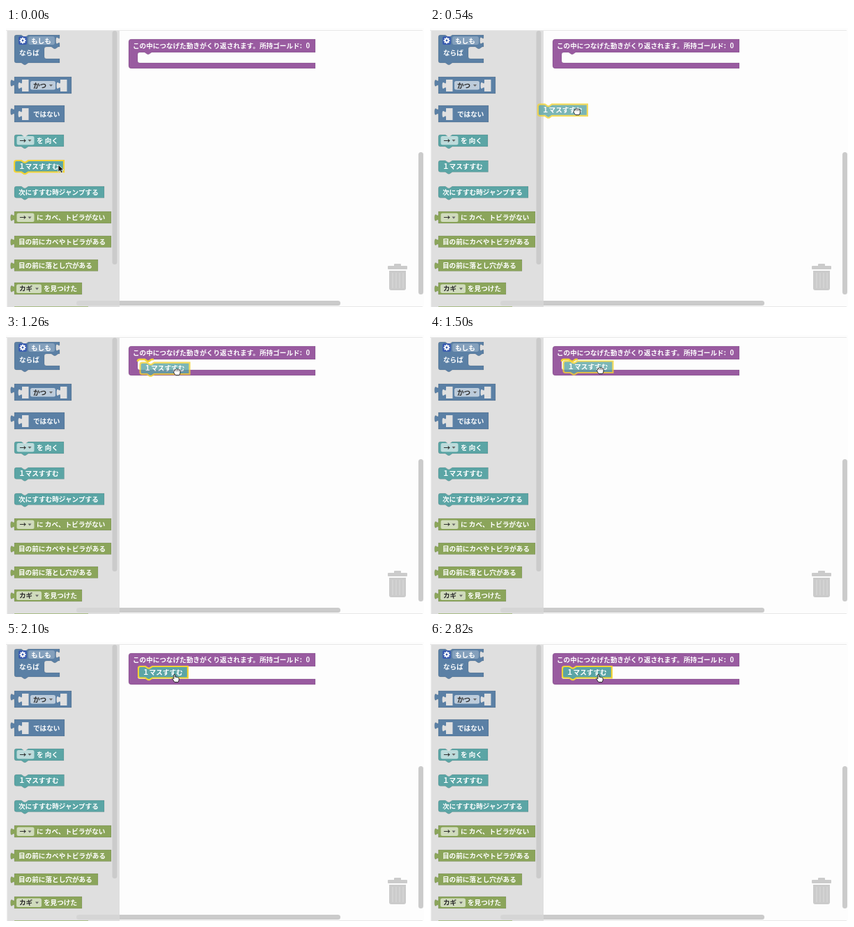
An HTML page for the animation above (2.88 s loop, 600 by 400 pixels).

```html
<!DOCTYPE html>
<html lang="ja">
<head>
<meta charset="utf-8">
<style>
html, body { margin: 0; width: 100%; height: 100%; overflow: hidden; background: #fdfdfd; }
svg { display: block; width: 600px; height: 400px; }
text { font: 700 9.65px "Noto Sans CJK JP", "Noto Sans CJK", "Noto Sans", sans-serif; fill: #fff; white-space: pre; }
.dark { fill: #2c2c2c; }
</style>
</head>
<body>
<svg id="stage" viewBox="0 0 600 400" xmlns="http://www.w3.org/2000/svg"></svg>
<script>
const LOOP = 2880, STEP = 60, PICK = 60, NEAR = 900, DROP = 1800;
const PANEL = '#e0e0e0', BAR = '#cbcbcb', GLOW = '#f3d335';
const LOGIC = '#5b80a5', MOVE = '#5ba5a5', SENSE = '#8ba55b', LOOP_COLOR = '#995ba0';

const notchRight = 'l4 2.7h2l4-2.7';
const notchLeft = 'l-4 2.7h-2l-4-2.7';
const tabDown = 'c0 6.8-5.4-5.4-5.4 5.1s5.4-1.7 5.4 5.1';
const tabUp = 'c0-6.8-5.4 5.4-5.4-5.1s5.4 1.7 5.4-5.1';

const path = (d, fill, extra = '') => `<path d="${d}" fill="${fill}" ${extra}/>`;
const rect = (x, y, w, h, fill, r = 0, opacity = 1) =>
  `<rect x="${x}" y="${y}" width="${w}" height="${h}" rx="${r}" fill="${fill}" fill-opacity="${opacity}"/>`;
const label = (x, y, s, cls = '') => `<text x="${x}" y="${y + 3.6}" class="${cls}">${s}</text>`;

// Solid block with a thin darker edge
const solid = (d, fill) => path(d, fill, 'stroke="#000" stroke-opacity=".14" stroke-width=".7"');

const commandPath = (w, h) =>
  `M0 3Q0 0 3 0H10${notchRight}H${w}V${h}H20${notchLeft}H3Q0 ${h} 0 ${h - 3}Z`;
const valuePath = (x, y, w, h) =>
  `M${x} ${y}h${w}v${h}h${-w}V${y + 14}${tabUp}Z`;
const socket = (x, y) => path(`M${x} ${y}h9.5v17h-9.5v-3.5${tabUp}Z`, PANEL);

const command = (x, y, w, h) => `<g transform="translate(${x} ${y})">${solid(commandPath(w, h), MOVE)}</g>`;
const value = (y, w, h, fill) => solid(valuePath(12, y, w, h), fill);

function dropdown(x, y, w, s) {
  const a = x + w - 9;
  return rect(x, y - 6, w, 12.5, '#fff', 2.5, .6) + label(x + 4, y, s, 'dark') +
    path(`M${a} ${y - 1}h5l-2.5 3z`, '#666');
}

function gear(x, y) {
  const teeth = [0, 45, 90, 135].map(a =>
    `<rect x="-1" y="-4.4" width="2" height="8.8" transform="rotate(${a})"/>`).join('');
  return rect(x - 6, y - 6, 12, 12, '#3a5cb0', 2.5) +
    `<g transform="translate(${x} ${y})" fill="#fff">${teeth}<circle r="3.2"/><circle r="1.4" fill="#3a5cb0"/></g>`;
}

function ifBlock() {
  const d = `M12 13Q12 10 15 10H22${notchRight}H77V13${tabDown}V27H75${notchLeft}H58Q55 27 55 30` +
    `V41Q55 44 58 44H77V50H32${notchLeft}H15Q12 50 12 47Z`;
  return solid(d, LOGIC) + rect(32, 12, 38, 12, '#fff', 3, .25) +
    gear(24, 18) + label(36, 18, 'もしも') + label(19, 35, 'ならば');
}

function trash() {
  const ribs = [555, 560, 565, 570].map(x => rect(x - .5, 351, 1, 22, '#dcdcdc')).join('');
  return rect(557, 338, 10, 4, BAR, 1) + rect(548, 341, 28, 5, BAR, 1) +
    path('M550 348H574V373Q574 376 571 376H553Q550 376 550 373Z', BAR) + ribs;
}

function loopPath(bottom) {
  return `M180 16H444V35H209${notchLeft}H192Q189 35 189 38V${bottom - 3}Q189 ${bottom} 192 ${bottom}` +
    `H444V${bottom + 8}H180Q176 ${bottom + 8} 176 ${bottom + 4}V20Q176 16 180 16Z`;
}

const palette = [
  ifBlock(),
  value(70, 82, 24, LOGIC), socket(23, 74), dropdown(35, 82, 36, 'かつ'), socket(78, 74),
  value(111, 72, 24, LOGIC), socket(23, 115), label(39, 123, 'ではない'),
  command(12, 153, 71, 17), dropdown(15.5, 161, 25, '→'), label(44, 161, 'を 向く'),
  command(12, 190, 71.5, 16.5), label(18, 198, '１マスすすむ'),
  command(12, 227, 129, 16.5), label(18, 235, '次にすすむ時ジャンプする'),
  value(263, 139, 17, SENSE), dropdown(15.5, 271.5, 25, '→'), label(44, 271.5, 'に カベ、トビラがない'),
  value(298, 139, 16.5, SENSE), label(18, 306, '目の前にカベやトビラがある'),
  value(332, 120, 16.5, SENSE), label(18, 340, '目の前に落とし穴がある'),
  value(365, 97, 17, SENSE), dropdown(15, 373.5, 36, 'カギ'), label(54, 373.5, 'を見つけた'),
  rect(12, 399, 106, 1, '#a9bd86')
].join('');

const highlight = `M189 38Q189 35 192 35H199${notchRight}H212`;

const cursors = {
  arrow: path('M0 0V10.5L2.5 8.3L4.4 12L6.3 11.1L4.6 7.6H8Z', '#111', 'stroke="#fff" stroke-width=".8"'),
  fist: path('M-4-1Q-4-4-2-3.4Q-1-5 .3-3.8Q1.8-4.8 2.8-3.2Q4.6-3.6 4.6-1.4V1Q4.4 3 3 4.6H-2Q-4.6 2-4.8 .4Q-5-.8-4-1Z',
    '#fff', 'stroke="#222" stroke-width="1"') + path('M-1.6-2.6V-.8M.5-3V-.8M2.5-2.6V-.8', 'none', 'stroke="#333" stroke-width=".7"'),
  point: path('M-2.6-4Q-1.6-5.6-.6-4V-.8Q.7-1.6 1.4-.4Q2.6-1 3.2 .2Q4.8-.2 4.8 1.4V3Q4.6 5 3.6 6.6H-1.4Q-3.4 4-5 1.6Q-4.4 0-2.6 1.8Z',
    '#fff', 'stroke="#222" stroke-width="1"')
};

const stage = document.getElementById('stage');
stage.innerHTML = `
  ${rect(0, 0, 600, 400, '#fdfdfd')}
  <path d="M0 3.5H598M163 399.5H598" fill="none" stroke="#e8e8e8"/>
  <path id="loop" fill="${LOOP_COLOR}" stroke="#000" stroke-opacity=".14" stroke-width=".7"/>
  ${label(182, 25, 'この中につなげた動きがくり返されます。所持ゴールド:')}${label(430.5, 25, '0')}
  ${trash()}
  ${rect(592, 178, 7, 204, BAR, 3.5)}
  ${rect(101, 391, 379, 7, BAR, 3.5)}
  ${rect(1.5, 4, 161.5, 396, '#d9d9d9', 0, .8)}
  ${palette}
  ${rect(152.5, 4, 7, 335, BAR, 3.5)}
  <path id="near" d="${highlight}" fill="none" stroke="${GLOW}" stroke-width="2.6"/>
  <g id="drag">
    <path d="${commandPath(71, 16.5)}" fill="${MOVE}" stroke="${GLOW}" stroke-width="2.2"/>
    ${label(6, 8, '１マスすすむ')}
  </g>
  ${Object.keys(cursors).map(k => `<g id="${k}">${cursors[k]}</g>`).join('')}`;

const el = id => document.getElementById(id);
const show = (id, on) => el(id).setAttribute('visibility', on ? 'visible' : 'hidden');
const place = (id, [x, y]) => el(id).setAttribute('transform', `translate(${x.toFixed(2)} ${y.toFixed(2)})`);

// Path of the hand: time, x, y
const handKeys = [[PICK, 65, 203.5], [540, 211, 120], [840, 247.5, 66.5],
  [1260, 245.5, 53], [1500, 244.5, 51], [DROP, 243.5, 51]];
const ARROW = [75, 196], HOME = [12, 190], DOCK = [190, 35];
const GRAB = [53, 13.5], LAG = 16;

// Monotone cubic through the keys, at rest at both ends
function handAt(t) {
  const keys = handKeys, last = keys.length - 1;
  if (t <= PICK) return keys[0].slice(1);
  if (t >= DROP) return keys[last].slice(1);
  const i = keys.findIndex(k => k[0] > t) - 1;
  const [a, b] = [keys[i], keys[i + 1]];
  const span = b[0] - a[0], u = (t - a[0]) / span;
  const chord = (j, c) => (keys[j + 1][c] - keys[j][c]) / (keys[j + 1][0] - keys[j][0]);
  const slope = (j, c) => {
    if (j === 0 || j === last) return 0;
    const p = chord(j - 1, c), q = chord(j, c);
    return p * q > 0 ? 2 * p * q / (p + q) : 0;
  };
  return [1, 2].map(c =>
    a[c] + (b[c] - a[c]) * u * u * (3 - 2 * u) +
    span * u * (1 - u) * (slope(i, c) * (1 - u) - slope(i + 1, c) * u));
}

// The dragged block trails the hand slightly
function blockAt(t) {
  if (t < PICK) return HOME;
  if (t >= DROP) return DOCK;
  return handAt(t - LAG).map((v, i) => v - GRAB[i]);
}

function render(time) {
  const t = Math.floor((time % LOOP) / STEP) * STEP;
  const dragging = t >= PICK && t < DROP;
  const cursor = t < PICK ? 'arrow' : dragging ? 'fist' : 'point';
  el('loop').setAttribute('d', loopPath(t < DROP ? 50 : 53));
  place('drag', blockAt(t));
  el('drag').setAttribute('opacity', dragging ? .8 : 1);
  show('near', t >= NEAR && t < DROP);
  Object.keys(cursors).forEach(k => show(k, k === cursor));
  place(cursor, t < PICK ? ARROW : handAt(t));
}

const start = performance.now();
function tick() {
  render(performance.now() - start);
  requestAnimationFrame(tick);
}
tick();
</script>
</body>
</html>
```
